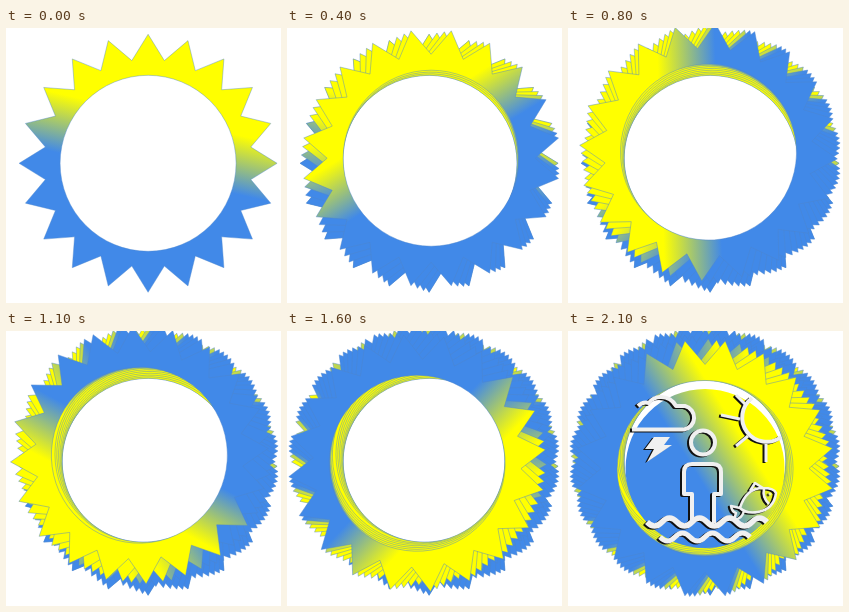
These frames come from a looping animation (275x275 px, 2.2 s). An HTML page:

```html
<!DOCTYPE html>
<html lang="en">
<head>
<meta charset="utf-8">
<title>Turning badge</title>
<style>
  html, body { margin: 0; width: 100%; height: 100%; overflow: hidden; background: #fff; }
  svg { display: block; width: 100vw; height: 100vh; }
  #icons { fill: none; stroke: #f0f0f0; stroke-width: 4; stroke-linejoin: round; filter: drop-shadow(-1.5px 1.5px 0 #111); }
</style>
</head>
<body>
<svg viewBox="0 0 275 275">
  <defs>
    <linearGradient id="sky" gradientUnits="userSpaceOnUse" x1="149.2" y1="87.8" x2="136.1" y2="144.3">
      <stop offset="0" stop-color="#ff0"/>
      <stop offset="1" stop-color="#4189e8"/>
    </linearGradient>
    <path id="ring" fill="url(#sky)" fill-rule="evenodd" stroke="#4d86cc" stroke-opacity=".7" stroke-width=".6"/>
  </defs>
  <g id="layers"></g>
  <g id="scene">
    <circle id="disc" r="79.5" fill="url(#sky)"/>
    <g id="icons">
      <path d="M64 98.500H116A12 12 0 0 0 117 75H108Q103 66 93 66Q85 66 81 72Q75 70 70 75"/>
      <path d="M86 106H102L96 114H104L79 131L86 118H77Z" fill="#f0f0f0" stroke="none"/>
      <circle cx="135" cy="111.500" r="12"/>
      <path d="M124 192V163H116V141Q116 133 124 133H145Q153 133 153 141V163H146V192"/>
      <path d="M184 67A24 24 0 0 0 213 106"/>
      <path d="M153 84L172 88M168 115L180 105M198 113V131M168 64L178 74" stroke-width="3"/>
      <path d="M172 177Q178 157 195 157Q206 157 208 162Q206 178 190 181Q178 183 172 177L163 175Q164 181 168 182L166 189Q174 188 176 180M196 158Q194 166 201 173M182 160L187 152L195 157" stroke-width="2.500"/>
      <circle cx="202" cy="163" r="1" stroke-width="1"/>
      <path class="wave" d="M79 191" data-bends="8" stroke-width="5.500"/>
      <path class="wave" d="M92 206" data-bends="6" stroke-width="5"/>
    </g>
  </g>
</svg>
<script>
const LOOP = 2200, STEP = 100, COUNT = LOOP / STEP, TEETH = 20;
const pivot = [137, 130.3], center = [142.1, 135.3];
const OUTER = 129, VALLEY = 104, HOLE = 88;
const byId = id => document.getElementById(id);

function ringPath() {
  const [cx, cy] = center;
  const points = Array.from({ length: TEETH * 2 }, (_, i) => {
    const a = i * Math.PI / TEETH, r = i % 2 ? VALLEY : OUTER;
    return `${cx + r * Math.sin(a)} ${cy - r * Math.cos(a)}`;
  });
  return `M${points.join('L')}ZM${cx - HOLE} ${cy}a${HOLE} ${HOLE} 0 1 0 ${HOLE * 2} 0a${HOLE} ${HOLE} 0 1 0 ${-HOLE * 2} 0Z`;
}

// The turn lags by one notch in the first half, then catches up.
const notch = k => k < COUNT / 2 ? Math.max(0, k - 1) : k;
const turn = k => `rotate(${-15 * notch(k)} ${pivot[0]} ${pivot[1]})`;

byId('ring').setAttribute('d', ringPath());
document.querySelectorAll('.wave').forEach(wave =>
  wave.setAttribute('d', wave.getAttribute('d') + 'q7.5 8 15 0' + 't15 0'.repeat(wave.dataset.bends - 1)));
byId('disc').setAttribute('cx', center[0]);
byId('disc').setAttribute('cy', center[1]);
byId('disc').setAttribute('transform', turn(COUNT - 1));

const layers = Array.from({ length: COUNT }, (_, k) => {
  const use = document.createElementNS('http://www.w3.org/2000/svg', 'use');
  use.setAttribute('href', '#ring');
  use.setAttribute('transform', turn(k));
  byId('layers').append(use);
  return use;
});

function draw(time) {
  const current = Math.floor(time % LOOP / STEP);
  layers.forEach((layer, k) => layer.style.display = k <= current ? '' : 'none');
  byId('scene').style.display = current === COUNT - 1 ? '' : 'none';
}

const start = performance.now();
function tick() {
  draw(performance.now() - start);
  requestAnimationFrame(tick);
}
tick();
</script>
</body>
</html>
```
